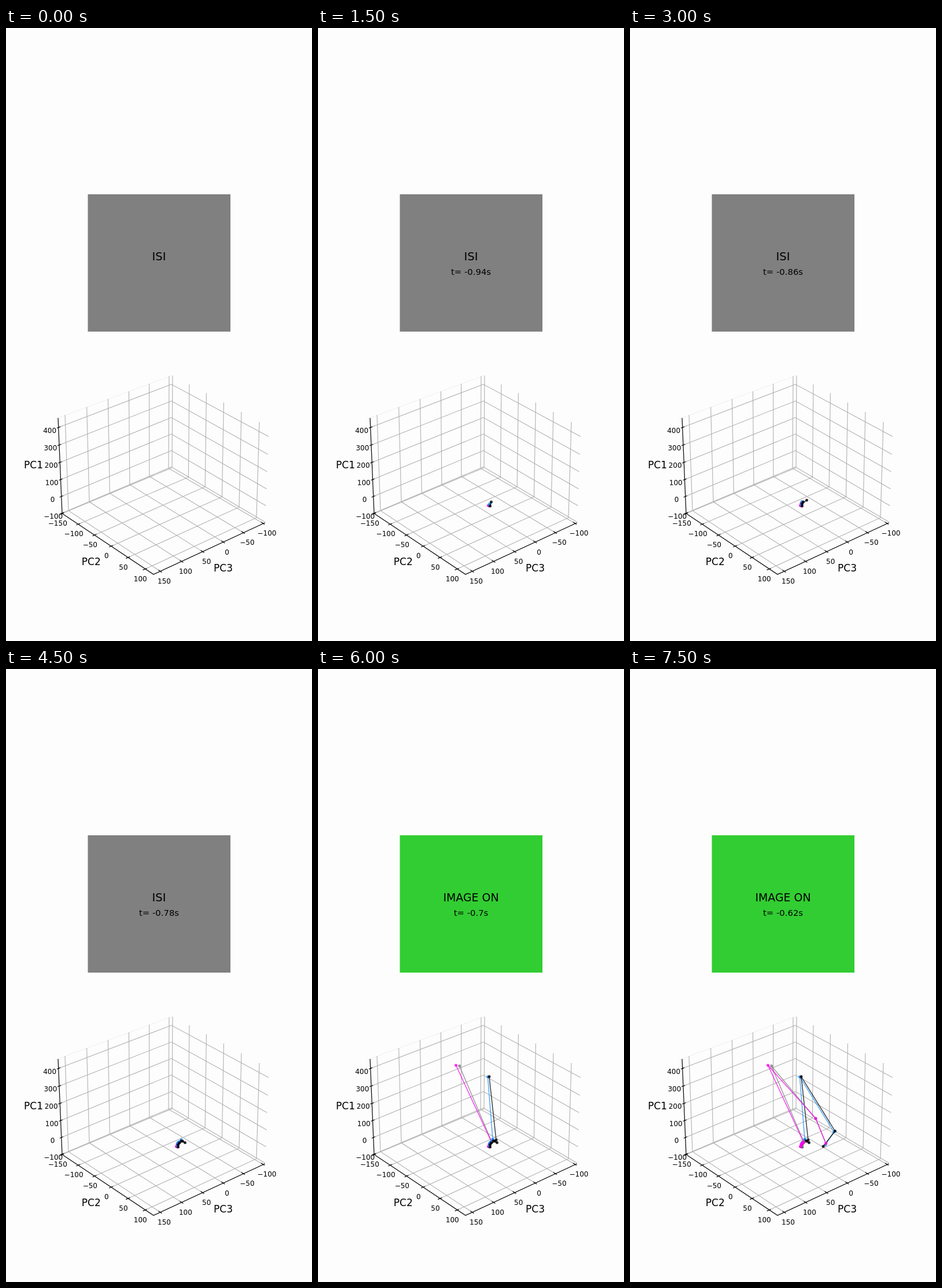
Animation of 529 by 1058 pixels, one loop 8000 ms. Source, as an HTML page:

```html
<!DOCTYPE html>
<html lang="en">
<head>
<meta charset="utf-8">
<title>Trajectories in PC space</title>
<style>
  html, body { margin: 0; width: 100%; height: 100%; overflow: hidden; background: #fdfdfd; }
  svg { display: block; width: 100vw; height: 100vh; }
  text { font-family: "DejaVu Sans", sans-serif; text-anchor: middle; }
  .grid { stroke: #b0b0b0; stroke-width: 1.1; fill: none; }
  .axis { stroke: #000; stroke-width: 1.2; fill: none; }
  .tick { font-size: 12px; }
  .label { font-size: 17px; }
  #clock { font-size: 14.85px; }
</style>
</head>
<body>
<svg id="stage" viewBox="0 0 529 1058">
  <rect id="panel" x="141.5" y="287" width="246.5" height="237"/>
  <text id="state" x="264.5" y="401"></text>
  <text id="clock" x="264.5" y="425.7"></text>
  <path d="M90 673L286 600" stroke="#efefef" fill="none"/>
  <g id="plot"></g>
  <path class="axis" d="M90 673L97 838L255 943L447.5 854"/>
  <text class="label" x="47.5" y="760">PC1</text>
  <text class="label" x="147.3" y="927">PC2</text>
  <text class="label" x="375.5" y="938">PC3</text>
  <g id="paths"></g>
</svg>
<script>
const STEP = 750, LOOP = 8000, LAST = 10;
const $ = id => document.getElementById(id);

function add(parent, tag, attrs, text) {
  const el = document.createElementNS('http://www.w3.org/2000/svg', tag);
  for (const key in attrs) el.setAttribute(key, attrs[key]);
  if (text !== undefined) el.textContent = text;
  parent.appendChild(el);
  return el;
}

// Perspective spacing of the ticks, approximated by a quadratic per coordinate.
const along = (x, y) => i => [x, y].map(([a, b, c]) => a + b * i + c * i * i);

const axes = [
  { // PC1
    rows: [along([97, -1.2, 0], [837.3, -28.6, -.2]), along([286, 0, 0], [757.5, -28.2, -.06]),
           along([448.3, 1.1, 0], [853, -28.2, -.28])],
    from: -100, by: 100, shift: [-15.3, 9.4], mark: [3, -1.2]
  },
  { // PC2
    rows: [along([97, 27.6, .2], [838, 18.2, .2]), along([287, 28.2, .2], [759, 15.9, .27]),
           along([288, 28.7, .26], [600, 14.6, .28])],
    from: -150, by: 50, shift: [-7.7, 20.5], mark: [3.4, -1.4]
  },
  { // PC3
    rows: [along([266.5, 37.3, -.36], [937.5, -17.2, .13]), along([108, 36.4, -.36], [833, -15.3, .13]),
           along([102, 38, -.4], [668, -14, .12])],
    from: 150, by: -50, shift: [7, 21.6], mark: [3, 2]
  }
];

for (const { rows, from, by, shift, mark } of axes) {
  for (let i = 0; i < 6; i++) {
    const [x, y] = rows[0](i), [dx, dy] = mark;
    add($('plot'), 'polyline', { class: 'grid', points: rows.map(row => row(i)).join(' ') });
    add($('plot'), 'path', { class: 'axis', d: `M${x - dx} ${y - dy}L${x + dx} ${y + dy}` });
    add($('plot'), 'text', { class: 'tick', x: x + shift[0], y: y + shift[1] },
      String(from + by * i).replace('-', '\u2212'));
  }
}

const tracks = [
  ['#808080', '296.5,825 297,823 297,821 298,819 299,818 301,816 300,815 244.5,685 321,776.3 339,819'],
  ['#f0e', '295,824.5 294.5,824 296,821 296,820 298,819 297.5,818 300,816.5 238.5,684 321,775.5 338.5,819'],
  ['#1e90ff', '296,823 297,821 297,820 297,817.5 299,816 303,812.5 302,811.5 293.5,704 352.5,799 337.5,821.5'],
  ['#000', '297.5,825 299.5,818 297.5,821 305.5,815 309.5,817.5 303,814.5 308,813 296,703.5 354.5,797.5 334,824']
].map(([color, list]) => {
  const points = list.split(' ');
  const group = add($('paths'), 'g', { opacity: 1 });
  const line = add(group, 'polyline', {
    fill: 'none', stroke: color, 'stroke-width': 1.4, 'stroke-opacity': .8, 'stroke-linejoin': 'round'
  });
  const dots = points.map(p => {
    const [cx, cy] = p.split(',');
    return add(group, 'circle', { cx, cy, r: 2.5, fill: color, 'fill-opacity': .8 });
  });
  return { group, points, line, dots };
});

let shown = -1;

function draw(step) {
  const on = step >= 7;
  $('panel').setAttribute('fill', on ? '#32cd32' : '#808080');
  $('state').textContent = on ? 'IMAGE ON' : 'ISI';
  $('state').setAttribute('font-size', on ? 18.9 : 19.6);
  $('clock').textContent = step ? `t= ${+(-1.02 + .04 * step).toFixed(2)}s` : '';

  for (const { points, line, dots } of tracks) {
    line.setAttribute('points', points.slice(0, step).join(' '));
    dots.forEach((dot, i) => dot.setAttribute('visibility', i < step ? 'visible' : 'hidden'));
  }
  // The depth order flips once the tracks swing back.
  const order = step >= 9 ? [2, 3, 0, 1] : [0, 1, 2, 3];
  order.forEach(i => $('paths').appendChild(tracks[i].group));
}

function tick() {
  const step = Math.min(LAST, Math.floor(performance.now() % LOOP / STEP));
  if (step !== shown) draw(shown = step);
  requestAnimationFrame(tick);
}
tick();
</script>
</body>
</html>
```
